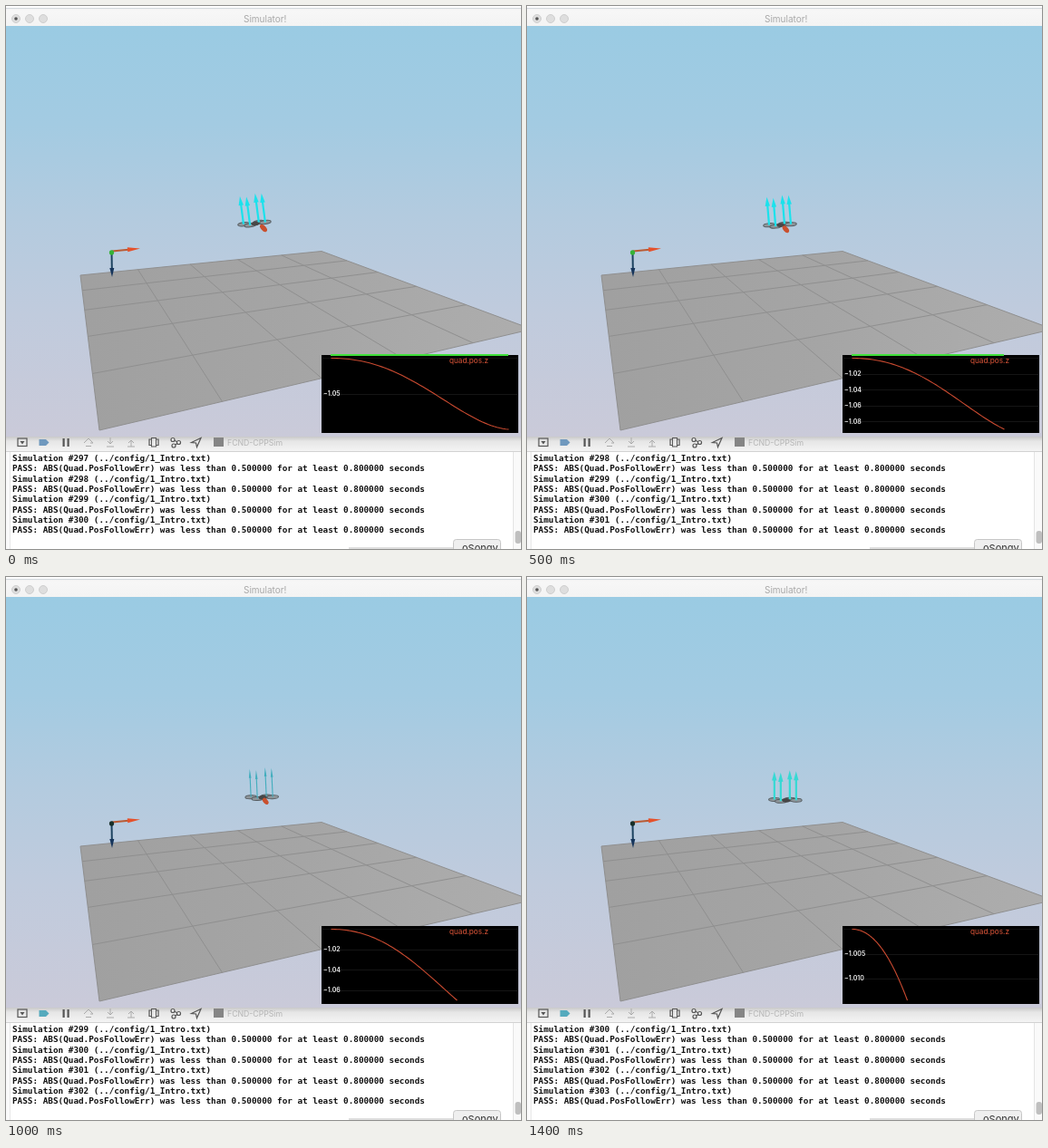
These frames come from a looping animation (568x599 px, 1.5 s). An HTML page with a canvas:

```html
<!DOCTYPE html>
<html lang="en">
<head>
<meta charset="utf-8">
<title>Simulator</title>
<style>
html, body { margin: 0; width: 568px; height: 599px; overflow: hidden; background: #fff; }
canvas { display: block; }
</style>
</head>
<body>
<canvas id="stage" width="568" height="599"></canvas>
<script>
const g = document.getElementById('stage').getContext('2d');
const STEP = 100, PLOT_W = 196, FIRST_RUN = 300;
// Plotted width of the current run at each step; a drop means a new run.
const progress = [196, 32, 66, 100, 134, 168, 196, 22, 61, 100, 139, 175, 4, 32, 61];
const SANS = 'Inter, "Open Sans", sans-serif';

function rect(x, y, w, h, color) {
  g.fillStyle = color;
  g.fillRect(x, y, w, h);
}

function path(points, { fill, stroke, width = 1, close = false } = {}) {
  g.beginPath();
  points.forEach(([x, y]) => g.lineTo(x, y));
  if (close) g.closePath();
  if (fill) { g.fillStyle = fill; g.fill(); }
  if (stroke) { g.strokeStyle = stroke; g.lineWidth = width; g.stroke(); }
}

function oval(x, y, rx, ry, { fill, stroke, width = 1, angle = 0 }) {
  g.beginPath();
  g.ellipse(x, y, rx, ry, angle, 0, Math.PI * 2);
  if (fill) { g.fillStyle = fill; g.fill(); }
  if (stroke) { g.strokeStyle = stroke; g.lineWidth = width; g.stroke(); }
}

function text(str, x, y, font, color) {
  g.font = font;
  g.fillStyle = color;
  g.fillText(str, x, y);
}

function gradient(x0, y0, x1, y1, stops) {
  const fill = g.createLinearGradient(x0, y0, x1, y1);
  stops.forEach(([at, color]) => fill.addColorStop(at, color));
  return fill;
}

function arrow(x0, y0, x1, y1, { color, shaft = 2, head = 9, half = 3, shaftColor = color }) {
  const len = Math.hypot(x1 - x0, y1 - y0);
  g.save();
  g.translate(x0, y0);
  g.rotate(Math.atan2(y1 - y0, x1 - x0));
  rect(0, -shaft / 2, len - head + 1, shaft, shaftColor);
  path([[len, 0], [len - head, -half], [len - head, half]], { fill: color, close: true });
  g.restore();
}

// Projective map of the unit square onto the quad a, b, c, d.
function projector([ax, ay], [bx, by], [cx, cy], [dx, dy]) {
  const ex = bx - cx, ey = by - cy, fx = dx - cx, fy = dy - cy;
  const sx = ax - bx + cx - dx, sy = ay - by + cy - dy;
  const det = ex * fy - fx * ey;
  const p = (sx * fy - fx * sy) / det, q = (ex * sy - sx * ey) / det;
  return (u, v) => {
    const w = p * u + q * v + 1;
    return [((bx - ax + p * bx) * u + (dx - ax + q * dx) * v + ax) / w,
            ((by - ay + p * by) * u + (dy - ay + q * dy) * v + ay) / w];
  };
}

function drawWindow() {
  rect(0, 0, 568, 599, '#fff');
  rect(0, 2, 568, 20, gradient(0, 2, 0, 22, [[0, '#ececec'], [.15, '#f7f7f7'], [1, '#f3f3f3']]));
  rect(0, 2, 568, 1, '#d3d9dd');
  for (const x of [11, 26, 41]) oval(x, 14, 4.5, 4.5, { fill: '#dedede', stroke: '#cfcfcf' });
  oval(11, 14, 1.8, 1.8, { fill: '#555' });
  text('Simulator!', 262, 17.5, '10px ' + SANS, '#a8a8a8');
  rect(0, 22, 568, 453, gradient(0, 22, 0, 475,
    [[0, '#9acbe3'], [.24, '#a3cbe2'], [.46, '#b3cbdf'], [.7, '#c0cbdd'], [1, '#cacad9']]));
}

function drawFloor() {
  const corners = [[82, 297], [348, 270.5], [580, 356.5], [103, 468]];
  const at = projector(...corners);
  path(corners, { fill: gradient(90, 330, 560, 360, [[0, '#a0a0a0'], [.5, '#a5a5a5'], [1, '#adadad']]), close: true });
  for (let i = 0; i <= 5; i++) {
    path([at(i / 5, 0), at(i / 5, 1)], { stroke: '#8f8f8f' });
    path([at(0, i / 5), at(1, i / 5)], { stroke: '#8f8f8f' });
  }
}

function drawAxes(u) {
  arrow(116.5, 272, 117, 299, { color: '#17365c', shaftColor: '#1d4360', head: 10, half: 2.5 });
  arrow(117, 270.5, 148, 267.5, { color: '#e5512b', shaftColor: '#b95b34', head: 14, half: 2.5 });
  oval(116.5, 272, 2.6, 2.8, { fill: u > .8 ? '#36b336' : '#18302a' });
}

function drawDrone(u) {
  const rotors = [[-13, -1], [-6, 1], [4, -1], [11, 0]];
  const thin = u > .65 && u < .8;
  const color = thin ? '#42adbd' : u > .8 ? '#1be2ec' : '#36d9d4';
  g.save();
  g.translate(286 - 11 * u ** 4, 247.5 - 7.5 * u ** 1.6);
  g.save();
  g.rotate(-.13 * u ** 3);
  path([rotors[0], rotors[3]], { stroke: '#5a5a5a', width: 1.5 });
  path([rotors[1], rotors[2]], { stroke: '#5a5a5a', width: 1.5 });
  for (const [x, y] of rotors) oval(x, y, 6.3, 2, { fill: '#8f959a', stroke: '#555c60' });
  oval(0, 0, 4.5, 2.3, { fill: '#474747' });
  rotors.forEach(([x, y], i) => arrow(x, y, x, [-32, -30.5, -33, -32][i],
    { color, shaft: thin ? 1.1 : 2.2, head: 10, half: thin ? 1.3 : 2.7 }));
  g.restore();
  if (u > .4) oval(1 + 8 * u ** 4, 2 + 3 * u, 2 + 3 * u, 1.8 + u, { fill: '#c9502e', angle: .85 });
  g.restore();
}

const drop = u => u * u * (.152 - .16 * (u - .43) ** 2);

function tickStep(range) {
  const unit = 10 ** Math.floor(Math.log10(range) + 1e-9);
  const lead = range / unit;
  return unit * (lead < 2 ? .5 : lead < 7 ? 1 : 2);
}

function drawPlot(u) {
  const range = drop(u), tiny = range < .0005;
  const zero = tiny ? 423 : 388.5;
  const scale = tiny ? 39 / .0005 : 78.5 / range;
  const step = tiny ? .0005 : tickStep(range);
  const digits = Math.ceil(-Math.log10(step) - 1e-9);
  rect(348, 385, 217, 86, '#000');
  for (let i = tiny ? 0 : 1; zero + i * step * scale < 464; i++) {
    const y = zero + i * step * scale;
    rect(349, Math.round(y), 215, 1, '#151515');
    text('\u2212' + (1 + i * step).toFixed(digits), 350, y + 2.5, '600 7px ' + SANS, '#eee');
  }
  if (!tiny) rect(349, 388, 215, 1, '#101010');
  const curve = [];
  for (let i = 0; i <= 60; i++) {
    const s = u * i / 60;
    curve.push([358.5 + PLOT_W * s, zero + drop(s) * scale]);
  }
  path(curve, { stroke: '#c94a30', width: 1.1 });
  if (u > .8) rect(358, 384, PLOT_W * u, 2, '#3fe03a');
  text('quad.pos.z', 489, 394, '8.2px ' + SANS, '#e0573a');
}

function drawToolbar(u) {
  rect(0, 475, 568, 17, gradient(0, 475, 0, 492, [[0, '#c9c9c9'], [.3, '#e6e6e6'], [1, '#f5f5f5']]));
  rect(0, 491, 568, 1, '#d2d2d2');
  const dark = { stroke: '#555', width: 1.2 }, pale = { stroke: '#aaa', width: 1 };
  g.strokeStyle = '#555';
  g.lineWidth = 1.2;
  g.strokeRect(13, 477, 10, 8.5);
  path([[15.5, 480], [20.5, 480], [18, 483.5]], { fill: '#555', close: true });
  path([[36.5, 478], [44, 478], [47.5, 481.5], [44, 485], [36.5, 485]],
    { fill: u > .8 ? '#7099be' : '#55aabd', close: true });
  rect(62.5, 477, 2.2, 9, '#555');
  rect(67.5, 477, 2.2, 9, '#555');
  path([[86, 482], [91, 477], [96, 482], [93, 482]], pale);
  path([[88, 485.5], [94, 485.5]], pale);
  for (const [x, dir] of [[115, 1], [138, -1]]) {
    path([[x, 481 - 5 * dir], [x, 481 + 2 * dir]], pale);
    path([[x - 3, 481 - dir], [x, 481 + 2 * dir], [x + 3, 481 - dir]], pale);
    path([[x - 4, 486], [x + 4, 486]], pale);
  }
  g.strokeStyle = '#555';
  g.strokeRect(160.5, 476.5, 5, 9.5);
  path([[160, 478], [158, 478], [158, 484.5], [160, 484.5]], dark);
  path([[166, 478], [168, 478], [168, 484.5], [166, 484.5]], dark);
  path([[184, 478.5], [190.5, 481.5], [185, 485]], dark);
  for (const [x, y] of [[184, 478.5], [190.5, 481.5], [185, 485]]) oval(x, y, 2, 2, { fill: '#f0f0f0', ...dark });
  path([[204.5, 481.5], [215, 476.5], [210.5, 486.5], [209.5, 482]], { ...dark, close: true });
  rect(229, 476, 11, 10, '#858585');
  text('FCND-CPPSim', 244, 484.5, '8.7px ' + SANS, '#b5b5b5');
}

function drawConsole(run, passed) {
  const lines = [];
  for (let n = run - 4; n <= run; n++) {
    lines.push(`Simulation #${n} (../config/1_Intro.txt)`);
    if (n < run || passed)
      lines.push('PASS: ABS(Quad.PosFollowErr) was less than 0.500000 for at least 0.800000 seconds');
  }
  lines.slice(-8).forEach((line, i) =>
    text(line, 7, 502 + 11.35 * i, 'bold 9.33px "DejaVu Sans Mono", monospace', '#111'));
  rect(0, 492, 4, 107, '#fafafa');
  rect(4, 492, 1, 107, '#e8e8e8');
  rect(559, 492, 9, 107, '#fafafa');
  rect(559, 492, 1, 107, '#e4e4e4');
  g.fillStyle = '#bfbfbf';
  g.beginPath();
  g.roundRect(561.5, 579, 6.5, 14, 3);
  g.fill();
  rect(378, 597, 116, 2, '#dedede');
  g.beginPath();
  g.roundRect(493.5, 588.5, 52, 20, 3);
  g.fillStyle = '#efefef';
  g.fill();
  g.strokeStyle = '#c6c6c6';
  g.lineWidth = 1;
  g.stroke();
  text('oSongy', 503, 602, '11px ' + SANS, '#333');
}

function draw(step) {
  let run = FIRST_RUN;
  for (let i = 1; i <= step; i++) if (progress[i] < progress[i - 1]) run++;
  const u = progress[step] / PLOT_W;
  drawWindow();
  drawFloor();
  drawAxes(u);
  drawDrone(u);
  drawPlot(u);
  drawToolbar(u);
  drawConsole(run, progress[step] > 40);
}

const start = performance.now();
function tick() {
  const elapsed = Math.max(0, performance.now() - start);
  draw(Math.floor(elapsed / STEP) % progress.length);
  requestAnimationFrame(tick);
}
tick();
</script>
</body>
</html>
```
